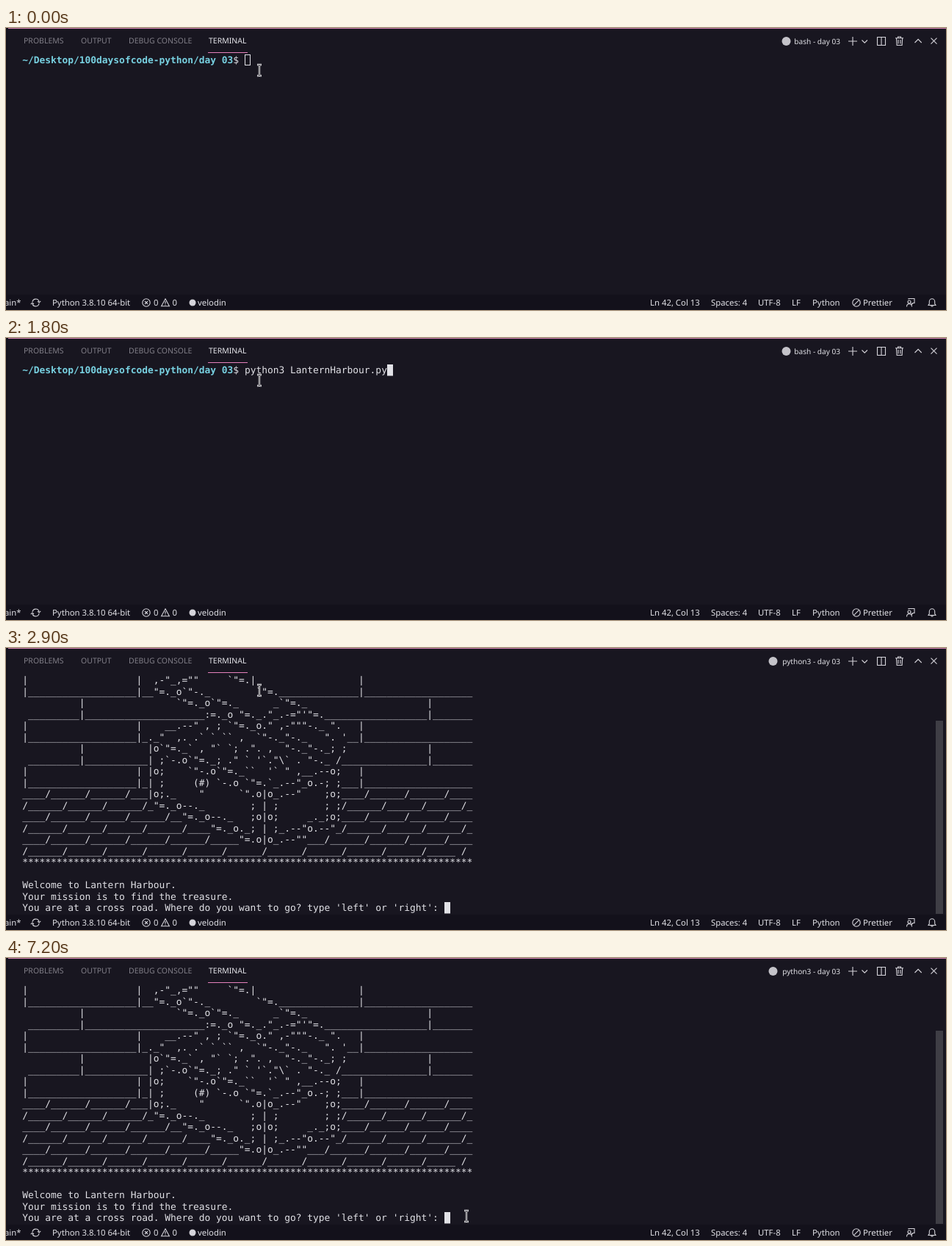
Animation, 1280 px wide and 384 px high, one loop 8000 ms. Source, as an HTML page:

```html
<!DOCTYPE html>
<html lang="en">
<head>
<meta charset="utf-8">
<title>Terminal session</title>
<style>
  html, body { margin: 0; width: 100%; height: 100%; overflow: hidden; background: #181620; }
  svg { display: block; }
  text { white-space: pre; text-rendering: geometricPrecision; fill: #e1e1e6; }
  .mono { font: 12.9px "DejaVu Sans Mono", monospace; }
  .path { font-weight: bold; fill: #78d1e1; }
  .tabs text { font: 10.5px "Noto Sans", sans-serif; fill: #807e87; }
  .tabs .active { fill: #e7e7ec; }
  .label { font: 10.1px "Noto Sans", sans-serif; }
  .status text { font: 11.35px "Noto Sans", sans-serif; }
  .icons { fill: none; stroke: #d5d4da; stroke-width: 1.1; }
</style>
</head>
<body>
<svg width="1280" height="384" viewBox="0 0 1280 384">
  <rect width="1280" height="384" fill="#181620"/>
  <rect y="363" width="1280" height="21" fill="#13111b"/>
  <rect width="2" height="363" fill="#13111b"/>
  <rect x="3" width="1277" height="1" fill="#d27fb0"/>

  <g class="tabs">
    <text x="24" y="21">PROBLEMS</text>
    <text x="102" y="21">OUTPUT</text>
    <text x="167" y="21">DEBUG CONSOLE</text>
    <text x="276" y="21" class="active">TERMINAL</text>
    <rect x="275" y="33" width="54" height="1" fill="#e580bb"/>
  </g>

  <circle id="shellIcon" cy="18" r="6" fill="#c4c3c9"/>
  <text id="shellLabel" class="label" x="1136" y="21.7" text-anchor="end"></text>

  <g class="icons">
    <path d="M1147 18h12M1153 12v12"/>
    <path d="M1165.5 16.5l3.7 3.7 3.7-3.7"/>
    <path d="M1186.5 12.5h11v11h-11zM1192 12.5v11"/>
    <path d="M1211 13.7h11M1214.5 13.5v-1.5h4v1.5M1212.5 14l.6 9.5h7l.6-9.5M1215 16v5.5M1218 16v5.5"/>
    <path d="M1237.5 20l4.6-4.6 4.6 4.6"/>
    <path d="M1259.5 13.7l8 8M1267.5 13.7l-8 8"/>
  </g>

  <g class="status">
    <text x="-2" y="378">ain*</text>
    <text x="63" y="378">Python 3.8.10 64-bit</text>
    <text x="201" y="378">0</text>
    <text x="226.5" y="378">0</text>
    <text x="261" y="378">velodin</text>
    <text x="877" y="378">Ln 42, Col 13</text>
    <text x="960" y="378">Spaces: 4</text>
    <text x="1024" y="378">UTF-8</text>
    <text x="1070" y="378">LF</text>
    <text x="1098" y="378">Python</text>
    <text x="1167" y="378">Prettier</text>
    <circle cx="254" cy="374" r="4.5" fill="#d5d4da"/>
  </g>

  <g class="icons">
    <path d="M36 373a4.6 4.6 0 0 1 9-.5M45 375a4.6 4.6 0 0 1-9 .5M43 372.3l2.2 1.6 2-2M38 375.7l-2.2-1.6-2 2"/>
    <circle cx="191" cy="374" r="5.2"/>
    <path d="M189 372l4 4M193 372l-4 4"/>
    <path d="M217 368.8l5.4 10h-10.8zM217 372v3.5M217 376.5v1"/>
    <circle cx="1158" cy="374" r="5.2"/>
    <path d="M1154.4 377.6l7.2-7.2"/>
    <path d="M1229 369.5v-1h8v6h-2l-1.8 1.8v-1.8"/>
    <circle cx="1230" cy="373" r="2"/>
    <path d="M1226.5 379.5c0-5 7-5 7 0"/>
    <path d="M1256 377.5h10l-1.3-2v-3a3.7 3.7 0 0 0-7.4 0v3zM1259.7 378a1.3 1.3 0 0 0 2.6 0"/>
  </g>

  <g id="session" class="mono">
    <text x="22.2" y="48"><tspan class="path">~/Desktop/100daysofcode-python/day 03</tspan>$ <tspan id="command"></tspan></text>
  </g>
  <g id="game" class="mono">
    <rect x="1266" y="99" width="10" height="263" fill="#3f3e45"/>
  </g>
  <rect id="block"/>

  <g id="mouse" fill="none">
    <path d="M-3-7.5h2l1 1 1-1h2M0-6.5v13M-3 7.5h2l1-1 1 1h2" stroke="#f4f4f6" stroke-width="2.4"/>
    <path d="M-2.5-7.5h1.5l1 1 1-1h1.5M0-6.5v13M-2.5 7.5h1.5l1-1 1 1h1.5" stroke="#17151d" stroke-width=".8"/>
  </g>
</svg>

<pre id="screen" hidden>
|                   |  ,-"_,=""     `"=.|                  |
|___________________|__"=._o`"-._        `"=.______________|___________________
          |                `"=._o`"=._      _`"=._                     |
 _________|_____________________:=._o "=._."_.-="'"=.__________________|_______
|                   |    __.--" , ; `"=._o." ,-"""-._ ".   |
|___________________|_._"  ,. .` ` `` ,  `"-._"-._   ". '__|___________________
          |           |o`"=._` , "` `; .". ,  "-._"-._; ;              |
 _________|___________| ;`-.o`"=._; ." ` '`."\` . "-._ /_______________|_______
|                   | |o;    `"-.o`"=._``  '` " ,__.--o;   |
|___________________|_| ;     (#) `-.o `"=.`_.--"_o.-; ;___|___________________
____/______/______/___|o;._    "      `".o|o_.--"    ;o;____/______/______/____
/______/______/______/_"=._o--._        ; | ;        ; ;/______/______/______/_
____/______/______/______/__"=._o--._   ;o|o;     _._;o;____/______/______/____
/______/______/______/______/____"=._o._; | ;_.--"o.--"_/______/______/______/_
____/______/______/______/______/_____"=.o|o_.--""___/______/______/______/____
/______/______/______/______/______/______/______/______/______/______/_____ /
*******************************************************************************

Welcome to Lantern Harbour.
Your mission is to find the treasure.
You are at a cross road. Where do you want to go? type 'left' or 'right': </pre>

<script>
const LOOP = 8000;
const LEFT = 22.2, TOP = 36, CHAR = 7.766, LINE = 15.5;
const PROMPT_COLS = 39;
const RUN = 'python3 LanternHarbour.py';

const $ = id => document.getElementById(id);
const set = (el, attrs) => {
  for (const name in attrs) el.setAttribute(name, attrs[name]);
};

// Each track lists [start time, value...]; values hold until the next entry.
const commands = [[0, ''], [1300, 'clear'], [1800, RUN]];
const mousePath = [
  [0, 345, 57.5],
  [4200, 430, 120], [4300, 509, 177.5],
  [6600, 492.5, 323], [6700, 540, 332], [6800, 588, 340], [6900, 620, 344],
  [7100, 624, 348], [7200, 627, 351.5]
];
const at = (track, t) => track.findLast(([start]) => t >= start).slice(1);

const lines = $('screen').textContent.split('\n');
lines.forEach((line, row) => {
  const text = document.createElementNS('http://www.w3.org/2000/svg', 'text');
  set(text, { x: LEFT, y: TOP + 12 + row * LINE });
  text.textContent = line;
  $('game').append(text);
});

function placeBlock(col, row, focused) {
  const inset = focused ? 0 : 0.5;
  set($('block'), {
    x: Math.round(LEFT + col * CHAR) + inset,
    y: TOP + row * LINE + inset,
    width: 8 - 2 * inset,
    height: focused ? LINE : 14,
    fill: focused ? '#e1e1e6' : 'none',
    stroke: focused ? 'none' : '#e1e1e6'
  });
}

function render(t) {
  const playing = t >= 2700;
  const [command] = at(commands, t);
  $('session').style.display = playing ? 'none' : '';
  $('game').style.display = playing ? '' : 'none';
  $('command').textContent = command;

  if (playing) placeBlock(lines.at(-1).length, lines.length - 1, true);
  else if (t >= 2600) placeBlock(0, 1, true);
  else placeBlock(PROMPT_COLS + command.length, 0, t >= 600);

  const inPython = t >= 2900;
  $('shellLabel').textContent = (inPython ? 'python3' : 'bash') + ' - day 03';
  set($('shellIcon'), { cx: inPython ? 1044.5 : 1062.5 });

  set($('mouse'), { transform: `translate(${at(mousePath, t)})` });
}

const begin = performance.now();
function tick() {
  render((performance.now() - begin) % LOOP);
  requestAnimationFrame(tick);
}
tick();
</script>
</body>
</html>
```
